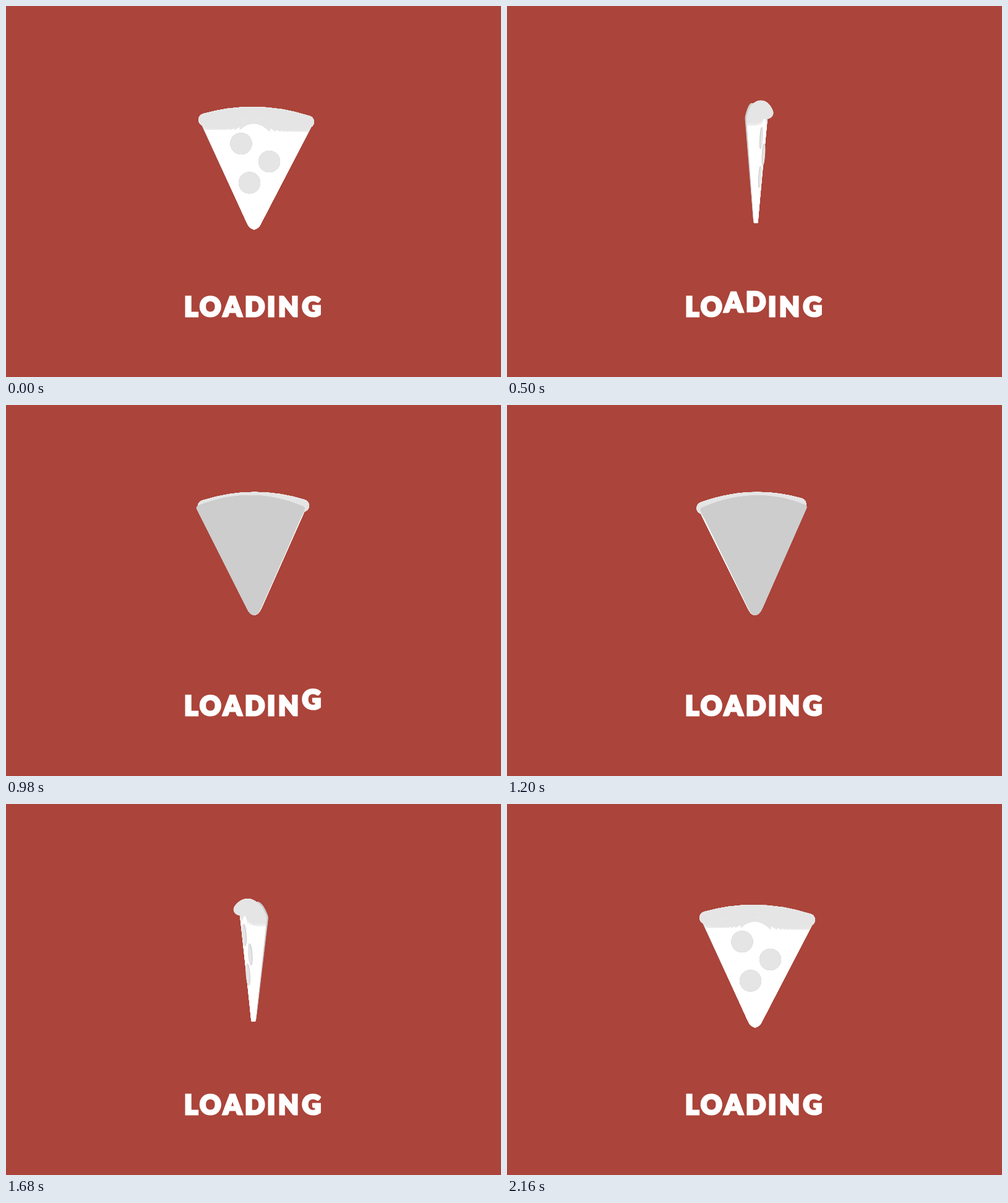
These frames come from a looping animation (800 by 600 pixels, 2.18 s). An HTML page with a canvas:

```html
<!DOCTYPE html>
<html>
<head>
<meta charset="utf-8">
<style>
html, body { margin: 0; width: 100%; height: 100%; overflow: hidden; background: #ab443a; }
canvas { display: block; }
</style>
</head>
<body>
<canvas id="stage" width="800" height="600"></canvas>
<script>
const ctx = document.getElementById('stage').getContext('2d');
const LOOP = 2180, TURN = 2160, STEP = 0.4, TILT = 0.05, AXIS = 401;
const WHITE = '#fff', LIGHT = '#e5e5e5', GREY = '#cdcdcd';

// x is measured from the spin axis
const plate = new Path2D('M-84 184Q2 150 92 185Q97 187 95 191L12 350Q7 361 0 361Q-7 361 -12 350L-86 190Q-88 186 -84 184Z');
const cheese = new Path2D('M-82 196Q2 168 90 199L12 350Q7 361 0 361Q-7 361 -12 350Z');
const band = new Path2D('M-86 188Q-86 185 -82 184Q2 152 91 186Q96 187 94 191L88 203Q2 178 -80 200Z');
const rim = new Path2D('M-80 183.5Q3 160 87 187');
const toppings = new Path2D();
for (const [x, y] of [[-21, 222], [24.5, 251], [-7.5, 285.5]]) {
  toppings.moveTo(x + 17.5, y);
  toppings.arc(x, y, 17.5, 0, 7);
}

const letters = [['L', 300.5], ['O', 330.5], ['A', 366], ['D', 403.5], ['I', 429], ['N', 457], ['G', 494]];

// Depth slices, ordered from back to front
function slices(from, to, make) {
  const list = [];
  for (let z = from; z <= to; z += STEP) list.push({ z, ...make(z) });
  return list;
}

const base = slices(-6, -3.8, () => ({ fills: [[plate, GREY]] }));
const body = slices(-3.8, 14.9, z => {
  const rise = Math.max(0, (z - 5.5) / 9.5);
  return { fills: [[cheese, WHITE], [band, LIGHT]], squeeze: Math.sqrt(1 - rise * rise) };
});
const crust = slices(-3.4, 19.4, z => ({ width: 20 * Math.sqrt(1 - ((z - 8) / 11.5) ** 2) }));
const discs = slices(13, 14.9, z => ({ fills: [[toppings, z > 14.4 ? LIGHT : GREY]] }));

function drawSlice({ z, fills, width, squeeze = 1 }, cos, sin, dy) {
  // All but the round crust get thinner towards the tip
  const k = fills ? -0.00435 * z : 0;
  const z0 = fills ? 1.87 * z : z;
  ctx.setTransform(cos * squeeze, -TILT * sin * squeeze, sin * k, 1 + TILT * cos * k,
    AXIS + sin * z0, dy + TILT * cos * z0);
  if (fills) {
    for (const [path, color] of fills) {
      ctx.fillStyle = color;
      ctx.fill(path);
    }
  } else {
    ctx.strokeStyle = LIGHT;
    ctx.lineWidth = width;
    ctx.stroke(rim);
  }
}

function drawPizza(t) {
  const angle = t / TURN * 2 * Math.PI;
  const turn = Math.cos(angle), sin = Math.sin(angle);
  const front = turn > 0;
  const cos = (front ? 1 : -1) * Math.max(0.03, Math.abs(turn));
  const parts = front ? [base, body, crust, discs] : [discs, body, crust, base];
  ctx.lineCap = 'round';
  for (const part of parts) {
    const order = front ? part : [...part].reverse();
    for (const slice of order) drawSlice(slice, cos, sin, 11 * (turn - 1));
  }
}

function drawText(t) {
  ctx.font = '900 42.5px Lato, Inter, sans-serif';
  ctx.fillStyle = ctx.strokeStyle = WHITE;
  ctx.lineWidth = 3;
  ctx.lineJoin = 'miter';
  ctx.miterLimit = 3;
  letters.forEach(([char, middle], i) => {
    const u = t / 140 - 1 - i;
    const y = 501.5 - 9.7 * Math.max(0, 1 - u * u);
    const ink = ctx.measureText(char);
    const x = middle - (ink.actualBoundingBoxRight - ink.actualBoundingBoxLeft) / 2;
    ctx.fillText(char, x, y);
    ctx.strokeText(char, x, y);
  });
}

function frame() {
  const t = Math.floor(performance.now() % LOOP / 20) * 20;
  ctx.setTransform(1, 0, 0, 1, 0, 0);
  ctx.fillStyle = '#ab443a';
  ctx.fillRect(0, 0, 800, 600);
  drawText(t);
  drawPizza(t);
  requestAnimationFrame(frame);
}
frame();
</script>
</body>
</html>
```
